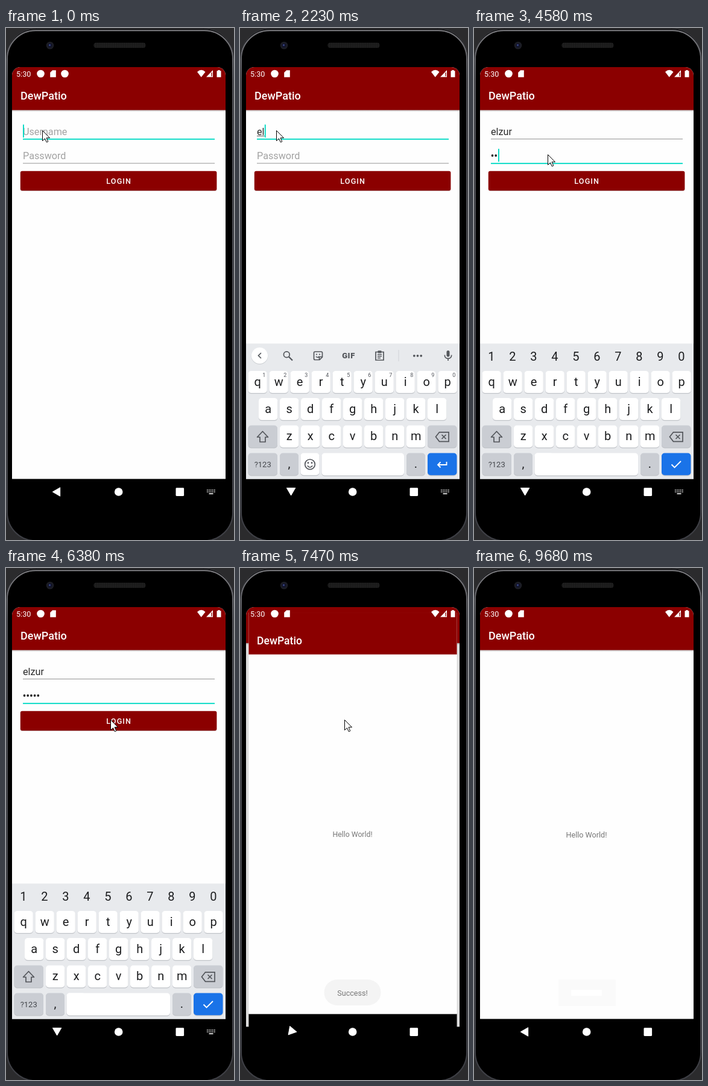
Animation of 378x851 px, one loop 9.99 s. Source, as an HTML page:

```html
<!DOCTYPE html>
<html lang="en">
<head>
<meta charset="utf-8">
<title>Login demo</title>
<style>
  html, body { margin: 0; width: 100%; height: 100%; overflow: hidden; background: #2b2b2d; }
  svg { display: block; width: 378px; height: 851px; }
  text { font-family: Roboto, "Noto Sans", sans-serif; font-size: 16.2px; }
  .mid { text-anchor: middle; }
  .title { font-size: 18px; font-weight: 500; fill: #fff; }
  .hint { fill: #a2a2a2; }
  .entry { fill: #2a2a2a; }
  .small { font-size: 12.6px; }
  .key { font-size: 20px; fill: #1c1d1f; }
  .sup { font-size: 9px; fill: #50535a; }
  .word { fill: #4a4d52; }
  .icon { fill: none; stroke: #53565b; stroke-width: 1.7; }
</style>
</head>
<body>
<svg viewBox="0 0 378 851">
  <defs>
    <clipPath id="screen"><path d="M10 800V79A14 14 0 0 1 24 65H350A14 14 0 0 1 364 79V800Z"/></clipPath>
    <clipPath id="buttonClip"><rect x="24" y="238" width="325" height="32" rx="3"/></clipPath>
    <pattern id="mesh" width="3" height="3" patternUnits="userSpaceOnUse">
      <rect width="3" height="3" fill="#191919"/><circle cx="1.5" cy="1.5" r=".8" fill="#2b2b2b"/>
    </pattern>
    <linearGradient id="shade" x2="0" y2="1">
      <stop stop-color="#000" stop-opacity=".28"/><stop offset="1" stop-color="#000" stop-opacity="0"/>
    </linearGradient>
    <linearGradient id="rim" x2="0" y2="1">
      <stop stop-color="#7c7c80"/><stop offset=".1" stop-color="#505157"/><stop offset="1" stop-color="#3e3f45"/>
    </linearGradient>
    <rect id="barShadow" x="10" y="136" width="354" height="3.4" fill="url(#shade)"/>
    <rect id="appBar" x="10" y="65" width="354" height="71.4" fill="#8b0000"/>
  </defs>

  <rect x=".5" y=".5" width="377" height="852" rx="50" fill="#141416" stroke="#38393d"/>
  <rect x="2" y="4.2" width="374" height="848" rx="47" fill="#000" stroke="url(#rim)" stroke-width="2"/>
  <circle cx="73" cy="29" r="6.3" fill="#1c1d24"/>
  <circle cx="73" cy="29" r="3.4" fill="#11142b"/>
  <circle cx="72.5" cy="28.5" r="1.4" fill="#3c4a8c"/>
  <rect x="145.5" y="24.5" width="86" height="8.5" rx="4" fill="url(#mesh)"/>

  <g clip-path="url(#screen)">
    <g id="login">
      <rect x="10" y="65" width="354" height="684.5" fill="#fefefe"/>
      <use href="#barShadow"/>
      <use href="#appBar"/>
      <text class="title" x="24" y="119">DewPatio</text>
      <text id="userHint" class="hint" x="28" y="178">Username</text>
      <text id="user" class="entry" x="28" y="178"></text>
      <rect id="spell" x="28" y="179" height="1" fill="#555"/>
      <rect id="userLine" x="28" width="318"/>
      <text id="passHint" class="hint" x="28" y="218">Password</text>
      <g id="dots" fill="#222"></g>
      <rect id="passLine" x="28" width="318"/>
      <rect x="24" y="239" width="325" height="32" rx="3" fill="#b9adad"/>
      <rect x="23.8" y="237.7" width="325.6" height="32.6" rx="3" fill="#8b0000"/>
      <g clip-path="url(#buttonClip)"><circle id="ripple" cx="174" cy="253" fill="#fff" opacity=".22"/></g>
      <text class="small" x="166.3" y="259" fill="#fff" font-weight="500" letter-spacing="1.12">LOGIN</text>
      <rect id="caret" width="1.9" height="21.5" fill="#03dac5"/>
      <rect id="dim" x="10" y="136.4" width="354" height="613.1" opacity=".13"/>
    </g>
    <g id="home">
      <rect x="10" y="749" width="354" height="76"/>
      <rect x="10" y="65" width="354" height="684.5" fill="#fefefe"/>
      <use id="homeShadow" href="#barShadow"/>
      <use href="#appBar"/>
      <text class="title" x="24" y="119">DewPatio</text>
      <text class="small mid" x="186.5" y="448" fill="#777">Hello World!</text>
    </g>
    <g id="keyboard">
      <rect x="10" y="524.5" width="354" height="225" fill="#e8eaed"/>
      <g id="strip">
        <circle cx="32.5" cy="545.3" r="13.8" fill="#c9ccd0"/>
        <circle cx="32.5" cy="544.5" r="13.6" fill="#fff"/>
        <path id="chevron" class="icon"/>
        <g fill="#53565b">
          <rect x="342.5" y="536" width="5" height="10.5" rx="2.5"/>
          <path class="icon" d="M339.3 543.5Q339.3 549.3 345 549.3T350.7 543.5M345 549V553"/>
        </g>
      </g>
      <g id="tools">
        <g class="icon">
          <circle cx="77.3" cy="542.8" r="4.9"/><path d="M81 546.5L87 552.5" stroke-width="2.2"/>
          <path d="M124.5 538H134.5Q136.5 538 136.5 540V547L132 551.5H124.5Q122.5 551.5 122.5 549.5V540Q122.5 538 124.5 538ZM136 546.5H131.5V551M126 546Q129 549 131 546"/>
          <path d="M225 538.5H238V552H225ZM228 542.5H235M228 545.5H235M228 548.5H233"/>
        </g>
        <g fill="#53565b">
          <circle cx="127" cy="542.5" r="1.1"/><circle cx="132" cy="542.5" r="1.1"/>
          <rect x="228.5" y="536.3" width="6" height="4" rx="1"/>
          <circle cx="288.8" cy="544.8" r="1.9"/><circle cx="294.5" cy="544.8" r="1.9"/><circle cx="300.2" cy="544.8" r="1.9"/>
        </g>
        <text class="mid" x="180" y="549.3" fill="#53565b" style="font-size:13px" font-weight="900" letter-spacing=".6">GIF</text>
        <path d="M263 535V554" stroke="#cfd2d6"/>
      </g>
      <g id="words">
        <text class="word mid" x="80" y="551">else</text>
        <text class="word mid" x="290" y="551">elbow</text>
      </g>
      <text id="guess" class="word mid" x="185.5" y="551"></text>
      <g id="digits"></g>
      <g id="keys"></g>
      <rect id="spaceShadow" y="707.5" height="37.5" rx="5" fill="#bfc2c7"/>
      <rect id="space" y="706.5" height="37.3" rx="5" fill="#fff"/>
      <g id="smiley" class="icon">
        <circle cx="116" cy="725.3" r="8.3"/><path d="M111.8 727.5Q116 733 120.2 727.5"/>
        <circle cx="113" cy="722.8" r=".6"/><circle cx="119" cy="722.8" r=".6"/>
      </g>
      <path class="icon" d="M37.5 670.5L28.5 680H33V688H42V680H46.5Z" stroke-linejoin="round"/>
      <path class="icon" d="M330.5 671.8H346V687.3H330.5L324.5 679.5ZM334.5 676L341.5 683M341.5 676L334.5 683"/>
      <path id="enter" fill="none" stroke="#fff" stroke-width="1.9"/>
    </g>
    <g id="toast">
      <rect id="pill" y="684" height="43"/>
      <rect id="blank" x="161" y="701" width="51" height="10" fill="#fff"/>
      <text id="success" class="small mid" x="186.5" y="710.5" fill="#777">Success!</text>
    </g>
  </g>

  <g fill="#fff">
    <text class="small" x="17" y="80.5">5:30</text>
    <circle cx="57.5" cy="76" r="6.3"/>
    <path d="M77 70.3H82.8V81.7H73.2V74Z"/>
    <circle id="notice" cx="97.5" cy="76" r="6.3"/>
    <path d="M317 73Q323.7 66.5 330.5 73L323.7 81.7Z"/>
    <path d="M343 70V81.5H332Z"/>
    <path d="M341 74V80.3" stroke="#8b0000" stroke-width="1.3"/>
    <path d="M351.3 70H354.7V71.3H356.5V81.7H349.5V71.3H351.3Z"/>
    <path id="back" d="M77.3 771L89.7 763.8V778.2Z" stroke="#fff" stroke-linejoin="round"/>
    <circle cx="186.7" cy="771" r="6.8"/>
    <rect x="281.5" y="764.3" width="13.6" height="13.6" rx="1.4"/>
    <g id="switcher">
      <path d="M333 768H347M333 771H347" fill="none" stroke="#fff" stroke-width="1.5" stroke-dasharray="1.6 1.4"/>
      <rect x="336.5" y="773.3" width="7" height="1.6"/>
    </g>
  </g>
  <path id="pointer" d="M0 0V17L4 13.3L6.8 19.4L9.3 18.3L6.6 12.2H12Z" fill="#fff" stroke="#000"/>
</svg>
<script>
const LOOP = 9990, NAME = 'elzur';
const ui = {};
document.querySelectorAll('[id]').forEach(el => ui[el.id] = el);

const set = (el, attrs) => { for (const k in attrs) el.setAttribute(k, attrs[k]); return el; };
const add = (parent, tag, attrs, text = '') => {
  const el = set(document.createElementNS('http://www.w3.org/2000/svg', tag), attrs);
  el.textContent = text;
  return parent.appendChild(el);
};
const show = (el, on) => { el.style.display = on ? '' : 'none'; };
const within = (t, a, b) => t >= a && t < b;

// Value of the last [time, value] pair already reached
const at = (t, pairs) => pairs.reduce((v, p) => t >= p[0] ? p[1] : v, pairs[0][1]);

// Progress 0..1 in n visible jumps, the first at a, the last at b
const jumps = (t, a, b, n) => t < a ? 0 : Math.min(1, (Math.floor((t - a) / (b - a) * (n - 1) + 1e-6) + 1) / n);
const mix = (a, b, k) => a + (b - a) * k;

function addKey(x, y, w, label, fill = '#fff') {
  add(ui.keys, 'rect', { x, y: y + 1, width: w, height: 37, rx: 5, fill: '#bfc2c7' });
  add(ui.keys, 'rect', { x, y, width: w, height: 36.8, rx: 5, fill });
  if (label) add(ui.keys, 'text', { x: x + w / 2, y: y + 24.6, class: 'key mid' }, label);
}

function buildKeyboard() {
  const gray = '#cacdd3';
  [['qwertyuiop', 13.5, 570], ['asdfghjkl', 31, 615], ['zxcvbnm', 66, 660.5]].forEach(([row, x, y]) =>
    [...row].forEach((c, i) => addKey(x + 35 * i, y, 31.3, c)));
  [...'1234567890'].forEach((d, i) => {
    add(ui.digits, 'text', { x: 28.8 + 35 * i, y: 552.5, class: 'key mid' }, d);
    add(ui.keys, 'text', { x: 39.7 + 35 * i, y: 580, class: 'sup mid' }, d);
  });
  addKey(13.5, 660.5, 48.5, '', gray);
  addKey(311, 660.5, 48.5, '', gray);
  addKey(13.5, 706.5, 48.5, '', gray);
  add(ui.keys, 'text', { x: 37.7, y: 730, class: 'mid', style: 'font-size:13px', fill: '#45484d' }, '?123');
  addKey(66, 706.5, 31, ',', gray);
  addKey(100.5, 706.5, 31, '');
  addKey(276, 706.5, 31, '.', gray);
  addKey(311, 706.5, 48.5, '', '#1a73e8');
  for (let i = 0; i < 5; i++) add(ui.dots, 'circle', { cx: 30.5 + 5.7 * i, cy: 212, r: 1.9 });
}

function pointerAt(t) {
  const toPass = jumps(t, 3260, 3660, 4), toLogin = jumps(t, 5470, 5920, 4);
  const up = jumps(t, 8230, 8516, 3), down = jumps(t, 8659, 9088, 4);
  const x = mix(mix(60.5, 122.5, toPass), 173.5, toLogin);
  const y = mix(mix(170.5, 210.5, toPass), 252.5, toLogin);
  return [mix(mix(x, 84.5, up), 263.5, down), mix(mix(y, 110.5, up), 788.5, down)];
}

function drawFields(t) {
  const typed = at(t, [[0, 0], [2230, 2], [2380, 3], [2530, 4], [2680, 5]]);
  const dots = at(t, [[0, 0], [4580, 2], [4870, 5]]);
  const onPass = t >= 4110;
  ui.user.textContent = NAME.slice(0, typed);
  const width = typed ? ui.user.getComputedTextLength() : 0;
  show(ui.userHint, !typed);
  show(ui.spell, typed && !onPass);
  ui.spell.setAttribute('width', width);
  show(ui.passHint, !dots);
  [...ui.dots.children].forEach((d, i) => show(d, i < dots));

  const line = (el, y, focus) =>
    set(el, { y: focus ? y : y + .2, height: focus ? 1.9 : 1, fill: focus ? '#03dac5' : '#949494' });
  line(ui.userLine, 183.8, !onPass);
  line(ui.passLine, 224.2, onPass);

  set(ui.caret, onPass ? { x: 28 + 6 * dots, y: 200.8 } : { x: typed ? 28.3 + width : 28, y: 160.5 });
  show(ui.caret, at(t, [[0, 1], [600, 0], [1060, 1], [1500, 0], [2230, 1], [2980, 0], [3260, 1], [3527, 0],
    [4110, 1], [4410, 0], [4580, 1], [5470, 0], [5920, 1], [6380, 0], [6850, 1]]));

  const radius = at(t, [[0, 0], [6530, 70], [6680, 200], [6850, 0]]);
  ui.ripple.setAttribute('r', radius);
}

function drawKeyboard(t) {
  const open = within(t, 1190, 7470), secret = t >= 4110, words = t >= 2380 && !secret;
  show(ui.keyboard, open);
  if (!open) return;
  show(ui.strip, !secret);
  show(ui.tools, t < 2380);
  show(ui.words, within(t, 2380, 2830));
  show(ui.guess, words);
  ui.guess.textContent = ui.user.textContent;
  show(ui.digits, secret);
  ui.keys.querySelectorAll('.sup').forEach(s => show(s, !secret));
  show(ui.smiley, !secret);
  const x = secret ? 100.5 : 135.5;
  [ui.space, ui.spaceShadow].forEach(r => set(r, { x, width: 272 - x }));
  ui.chevron.setAttribute('d', words ? 'M30 540L34.5 544.5L30 549' : 'M35 540L30.5 544.5L35 549');
  ui.enter.setAttribute('d', secret
    ? 'M327.5 725.5L332.5 730.5L343 720'
    : 'M342.5 721V726H328M332.5 721.5L328 726L332.5 730.5');
}

// Scales a window about the middle of the display
function zoom(el, s) {
  el.setAttribute('transform', `translate(187 426) scale(${s}) translate(-187 -426)`);
}

function draw(t) {
  drawFields(t);
  drawKeyboard(t);

  const done = t >= 7470;
  show(ui.login, t < 7620);
  show(ui.home, done);
  show(ui.homeShadow, t >= 7620);
  show(ui.dim, done);
  zoom(ui.login, done ? 1.04 : 1);
  zoom(ui.home, at(t, [[0, .975], [7620, .996], [7770, 1]]));

  const fading = t >= 9230;
  show(ui.toast, done);
  set(ui.pill, fading
    ? { x: 140, width: 95, height: 44, rx: 0, fill: '#fafafa' }
    : { x: 139.5, width: 94, height: 43, rx: 21.5, fill: '#f4f4f4' });
  const ink = at(t, [[0, 1], [9380, .6], [9530, .25], [9680, 0]]);
  ui.success.setAttribute('opacity', ink);
  ui.blank.setAttribute('opacity', 1 - ink);

  const turn = t < 7470 ? -90 * jumps(t, 150, 600, 4) : at(t, [[7470, -50], [7620, -10], [7770, 0]]);
  ui.back.setAttribute('transform', `rotate(${turn} 83.9 770.3)`);
  show(ui.notice, t < 1650);
  show(ui.switcher, !done);
  ui.pointer.setAttribute('transform', `translate(${pointerAt(t)})`);
  show(ui.pointer, t < 9230);
}

buildKeyboard();
const start = performance.now();
(function tick() {
  draw((performance.now() - start) % LOOP);
  requestAnimationFrame(tick);
})();
</script>
</body>
</html>
```
